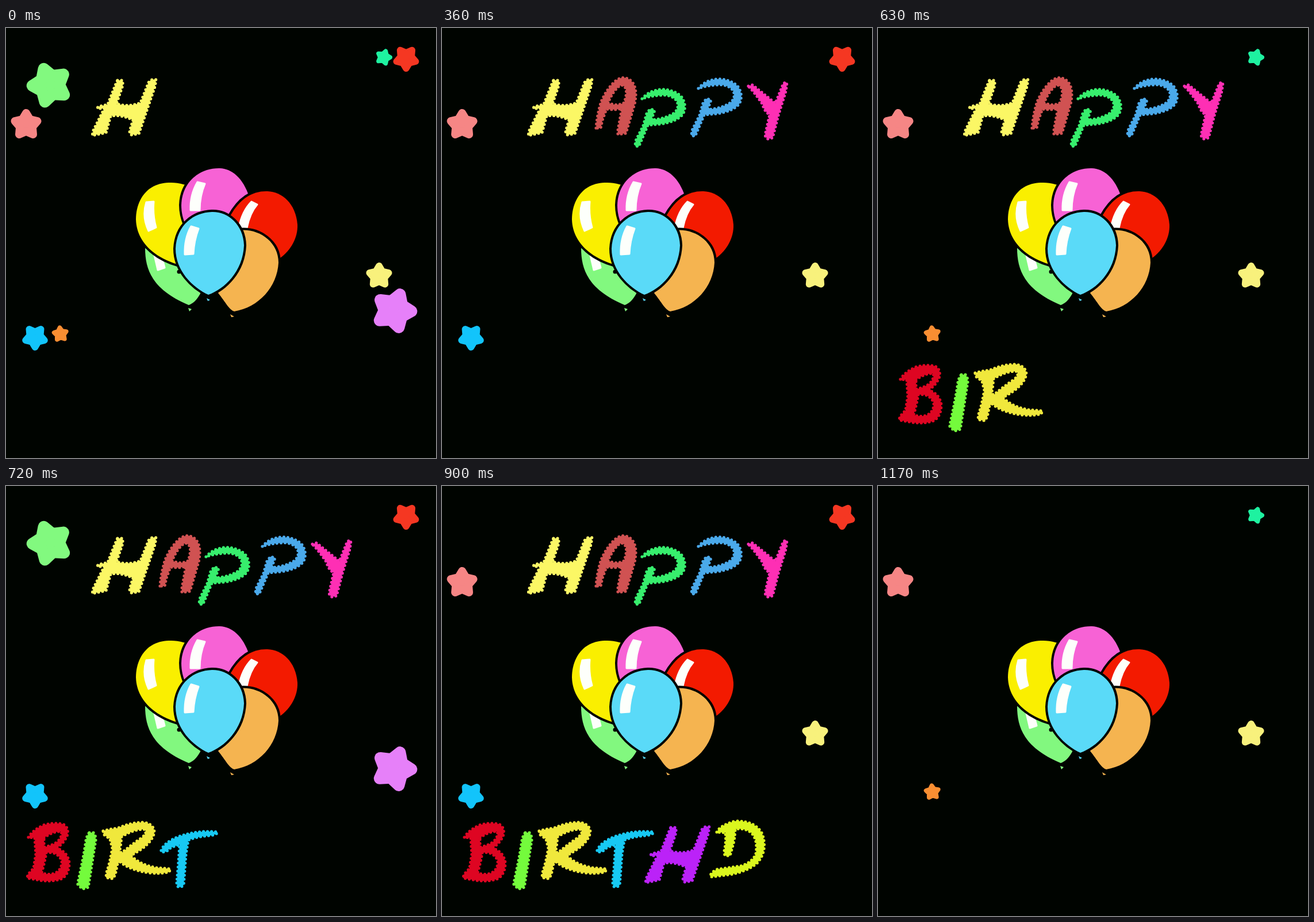
Animation, 748 px wide and 748 px high, one loop 1.26 s. Source, as an HTML page:

```html
<!DOCTYPE html>
<html lang="en">
<head>
<meta charset="utf-8">
<title>Happy Birthday</title>
<style>
  html, body { margin: 0; width: 100%; height: 100%; overflow: hidden; background: #000400; }
  svg { display: block; width: 100vw; height: 100vh; }
  .balloon { stroke: #000400; stroke-width: 8; stroke-linejoin: round; paint-order: stroke; }
  .shine { fill: #fdfffb; stroke: #fdfffb; stroke-width: 3; stroke-linejoin: round; }
  /* round dots along the outline give the scalloped edge */
  .glyph { fill: currentColor; fill-rule: evenodd; stroke: currentColor; stroke-width: 5.2; stroke-linecap: round; stroke-dasharray: 0 7; }
  .star { stroke-linejoin: round; }
</style>
</head>
<body>
<svg viewBox="0 0 748 748" xmlns="http://www.w3.org/2000/svg">
  <defs>
    <path id="H" class="glyph" d="M194 91L203 91L203 100L192 132Q215 138 234 130L248 95Q252 88 261 90L259 102L231 184L217 186L215 180L221 160Q200 150 182 153L174 182L150 187L152 178L171 140L159 140L160 137L177 133L190 100Z"/>
    <path id="A" class="glyph" d="M268 174Q270 150 277 128Q287 105 302 92Q316 81 329 92Q341 104 335 132L320 183L306 185L306 178L313 140Q300 143 286 141L279 160L276 174ZM289 130Q304 137 317 130Q323 112 319 104Q314 96 307 102Q296 112 289 130Z"/>
    <path id="P" class="glyph" d="M348 123Q360 109 380 107Q402 106 416 119Q427 134 419 150Q408 163 380 167L358 169L345 200L342 206L336 205L337 196L350 170L356 149L362 141L370 143L364 160Q390 158 405 147Q414 137 408 126Q398 115 380 117Q362 118 348 123Z"/>
    <path id="Y" class="glyph" d="M533 101L540 99L580 131L594 96L600 95L598 110L585 152L575 191L566 193L562 187L570 151Q560 144 558 133Q546 115 533 101Z"/>
    <path id="B" class="glyph" d="M39 611Q46 599 65 590Q82 585 98 588Q109 592 107 606Q103 619 88 630Q107 636 110 655Q110 675 97 683Q80 689 60 686L37 682L38 676L48 665L52 640L50 612ZM66 612Q82 600 96 601Q99 610 88 620Q76 627 66 628ZM70 638Q90 635 97 652Q98 668 84 674Q72 677 62 673Q67 655 70 638Z"/>
    <path id="I" class="glyph" d="M145 603L152 603Q158 610 155 622L143 698L133 701L125 693L126 686Q133 655 138 625Q139 610 145 603Z"/>
    <path id="R" class="glyph" d="M169 600Q180 597 195 595Q218 585 240 585Q257 588 258 602Q255 618 235 632L217 643Q235 660 262 664L286 666L284 671Q270 675 250 673Q215 668 199 654L194 657L190 676L186 683L174 681L175 672Q181 655 185 630L181 614L170 606ZM201 610Q222 597 240 597Q248 602 236 612Q217 625 203 637Q196 640 199 628Z"/>
    <path id="T" class="glyph" d="M270 634Q275 620 300 610Q335 598 368 602Q368 606 355 608Q330 610 317 616L313 640L309 694Q303 700 298 696L297 690Q300 660 302 624Q285 628 281 634Q274 639 270 634Z"/>
    <path id="D" class="glyph" d="M478 602Q484 590 510 583Q545 582 557 605Q567 635 548 656Q530 671 500 676L467 680Q466 673 478 667L520 661Q540 655 546 640Q550 615 538 603Q527 594 510 597Q509 615 506 625L501 643L492 643L491 635Q495 618 493 603Z"/>
  </defs>

  <g id="stars"></g>

  <g class="balloon">
    <path fill="#82f87f" d="M242 383C242 422 256 456 318 482C328 478 334 470 339 460L330 400L298 400Z"/>
    <path class="shine" d="M257 391L271 398L276 417L264 421Z"/>
    <path fill="#faef00" d="M283 269C245 270 226 300 226 333C227 370 255 398 298 411L340 360L330 280C310 270 295 269 283 269Z"/>
    <path fill="#f762d5" d="M372 244C337 243 306 268 305 308C305 322 308 332 312 342L392 335L421 288C410 259 392 245 372 244Z"/>
    <path fill="#f31a00" d="M455 284C430 283 407 296 390 327L400 360L477 400C495 387 508 365 507 342C504 305 480 285 455 284Z"/>
    <path class="shine" d="M427 302L437 307Q424 322 419 348L405 347Q411 318 427 302Z"/>
    <path fill="#f5b450" d="M405 352C440 348 474 372 474 408C472 450 440 486 397 493C388 490 382 477 369 461L395 400Z"/>
    <path fill="#5adaf8" d="M358 320C386 319 413 342 414 378C412 424 380 454 352 464C324 451 295 422 295 384C297 342 327 321 358 320Z"/>
  </g>
  <g class="shine">
    <path d="M244 303L257 302Q255 325 261 347L248 353Q236 328 244 303Z"/>
    <path d="M333 268L346 271Q337 292 337 317L321 317Q320 290 333 268Z"/>
    <path d="M322 345L335 349Q327 370 326 393L311 394Q310 366 322 345Z"/>
  </g>
  <circle cx="301" cy="424" r="3.5" fill="#000400"/>
  <path fill="#82f87f" d="M317 487l6 2l-4 4z"/>
  <path fill="#5adaf8" d="M349 470l6 3l-4 2z"/>
  <path fill="#f5b450" d="M390 498l7 4l-5 1z"/>

  <g id="words"></g>
</svg>

<script>
const NS = 'http://www.w3.org/2000/svg';
const STEP = 90, COUNT = 14;
const rules = [];

function add(parent, tag, attrs) {
  const el = document.createElementNS(NS, tag);
  for (const k in attrs) el.setAttribute(k, attrs[k]);
  document.getElementById(parent).append(el);
}

// Each mark in the pattern is one step of the loop: 1 shown, 0 hidden.
function blink(name, pattern) {
  const keys = [...pattern].map((v, i) => `${i * 100 / COUNT}%{opacity:${v}}`);
  keys.push(`100%{opacity:${pattern[0]}}`);
  rules.push(`@keyframes ${name}{${keys.join('')}}
    .${name}{animation:${name} ${STEP * COUNT}ms step-end infinite}`);
}

// A thick round-joined stroke softens the five tips.
function star(group, x, y, r, turn, color) {
  const points = [];
  for (let i = 0; i < 10; i++) {
    const a = (turn - 90 + i * 36) * Math.PI / 180;
    const d = r * (i % 2 ? 0.42 : 0.75);
    points.push((x + d * Math.cos(a)).toFixed(2) + ',' + (y + d * Math.sin(a)).toFixed(2));
  }
  add('stars', 'polygon', {
    class: 'star ' + group, points: points.join(' '),
    fill: color, stroke: color, 'stroke-width': r * 0.5
  });
}

blink('large', '10110110110110');
blink('pastel', '11011001011001');
blink('small', '11100101000101');
blink('down', '10101010101010');

star('large', 76, 99.3, 40.3, -20, '#82f97f');
star('large', 675, 491.7, 40.4, 20, '#e680f9');
star('pastel', 35, 168.4, 27.5, 0, '#f68685');
star('pastel', 649, 431.4, 23.4, 0, '#f8f17c');
star('small', 657, 51, 15, 90, '#1ef2a0');
star('small', 94.5, 532.3, 15, -5, '#f98e32');
star('down', 696, 52.8, 23.3, 180, '#f53722');
star('down', 50.5, 537.9, 23.1, 180, '#12c4fb');

// letter, colour, shift from the shared glyph
const letters = [
  ['H', '#fbf765'], ['A', '#d05252'], ['P', '#37ee6d'], ['P', '#4aa9ea', 98, -18], ['Y', '#fe2fb4'],
  ['B', '#de0522'], ['I', '#74fb3c'], ['R', '#f0e83c'], ['T', '#17c9f4'],
  ['H', '#bb22f8', 204, 503], ['D', '#daf61e'], ['A', '#f45fd8', 295.5, 515], ['Y', '#08dc98', 110, 492.5]
];
letters.forEach(([id, color, x = 0, y = 0], i) => {
  blink('letter' + i, '0'.repeat(i) + '1'.repeat(COUNT - 1 - i) + '0');
  add('words', 'use', { href: '#' + id, x, y, color, class: 'letter' + i });
});

const sheet = document.createElement('style');
sheet.textContent = rules.join('\n');
document.head.append(sheet);
</script>
</body>
</html>
```
